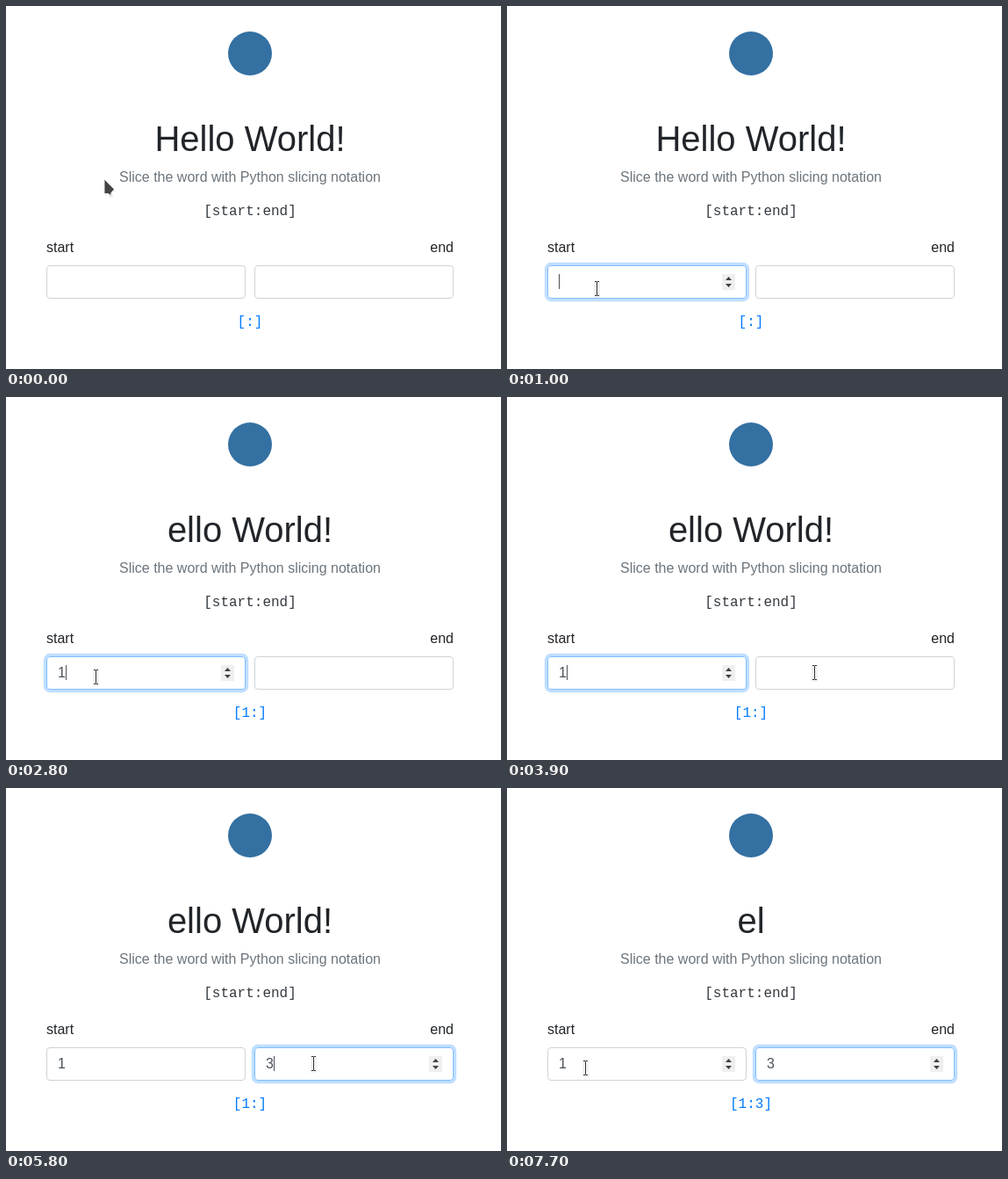
These frames come from a looping animation (564 px wide and 413 px high, 8 s). An HTML page:

```html
<!DOCTYPE html>
<html lang="en">
<head>
<meta charset="utf-8">
<title>Slicing demo</title>
<style>
  html, body { margin: 0; width: 564px; height: 413px; overflow: hidden; background: #fff; }
  body { position: relative; font: 16px/24px "Liberation Sans", sans-serif; color: #212529; }
  body > *, .field > * { position: absolute; }
  .row { left: 0; width: 556px; text-align: center; white-space: pre; }
  .mono { font-family: "Liberation Mono", monospace; }
  .logo { left: 253px; top: 29px; width: 50px; height: 50px; border-radius: 50%; background: #3470a2; }
  #title { top: 127px; font-size: 40px; line-height: 48px; }
  .field { top: 295px; width: 227px; height: 38px; box-sizing: border-box; border: 1px solid; border-radius: 4px; color: #495057; }
  .value { left: 12px; top: 6px; }
  .caret { top: 9px; width: 1px; height: 17px; background: #495057; }
  .spin { left: 198px; top: 9px; width: 15px; height: 18px; background: #efefef; }
  .pointer { left: 0; top: 0; overflow: visible; }
</style>
</head>
<body>
<div class="logo"></div>
<div class="row" id="title"></div>
<div class="row" style="top:183px;color:#6c757d">Slice the word with Python slicing notation</div>
<div class="row mono" style="top:222px;color:#343a40">[start:end]</div>
<div style="left:46px;top:263px">start</div>
<div style="right:54px;top:263px">end</div>
<div class="field" id="start" style="left:46px"></div>
<div class="field" id="end" style="left:283px"></div>
<div class="row mono" id="slice" style="top:348px;color:#007bff"></div>
<svg class="pointer" id="arrow" width="1" height="1">
  <path d="M1 2V19L4.5 16.5 7 21 10 19.5 8.5 15 13 14Z" fill="#000" opacity=".1"/>
  <path d="M0 0V16.5H4.5L7.5 18.8 8 15.5 11.3 11.5Z" fill="#444" stroke="#fff" stroke-width=".8"/>
</svg>
<svg class="pointer" id="beam" width="1" height="1">
  <path d="M-3.5 -8.5H3.5V10.5H-3.5Z" fill="#000" opacity=".05"/>
  <path d="M-2.5 -8H-.5L0 -7.5 .5 -8H2.5M0 -7.5V7.5M-2.5 8H-.5L0 7.5 .5 8H2.5" fill="none" stroke="#333"/>
</svg>
<script>
const LOOP = 8000, STEP = 100, WORD = 'Hello World!';
const $ = id => document.getElementById(id);

// Pointer positions: time, x, y; each holds until the next
const path = [
  [0, 112, 197], [100, 112, 201], [200, 110, 230], [300, 106, 272],
  [400, 103.5, 308], [500, 102.5, 322.5], [1000, 102.5, 321.5],
  [1100, 102.5, 323.5], [1300, 102.5, 319.5], [1500, 102.5, 318.5],
  [3600, 128.5, 317.5], [3700, 220.5, 311.5], [3800, 325.5, 306.5], [3900, 350.5, 313.5],
  [6700, 340.5, 314.5], [6800, 292.5, 316.5], [6900, 235.5, 319.5], [7000, 180.5, 320.5],
  [7100, 130.5, 321.5], [7200, 100.5, 320.5], [7300, 89.5, 318.5]
];

const during = (t, ...spans) => spans.some(([from, to]) => t >= from && t < to);
const ease = (t, from) => {
  const u = Math.min(1, Math.max(0, (t - from) / 150));
  return u * u * (3 - 2 * u);
};
const mix = (a, b, p) => a.map((v, i) => Math.round(v + (b[i] - v) * p));
const show = (el, on) => { el.style.visibility = on ? 'visible' : 'hidden'; };

function makeField(id) {
  const el = $(id);
  el.innerHTML = '<span class="value"></span><i class="caret"></i>' +
    '<svg class="spin"><path d="M4 7H11L7.5 3ZM4 11H11L7.5 15Z" fill="#404040"/></svg>';
  const [value, caret, spin] = el.children;
  return (text, focus, caretOn, spinOn) => {
    value.textContent = text;
    caret.style.left = (text ? 21 : 12) + 'px';
    show(caret, caretOn);
    show(spin, spinOn);
    el.style.borderColor = `rgb(${mix([206, 212, 218], [128, 189, 255], focus)})`;
    el.style.boxShadow = `0 0 0 ${3.2 * focus}px rgba(0,123,255,${0.25 * focus})`;
  };
}
const drawStart = makeField('start'), drawEnd = makeField('end');

function draw(now) {
  const t = Math.floor(now % LOOP / STEP) * STEP;
  const start = t >= 2800 ? '1' : '';
  const end = t >= 5900 ? '3' : '';
  const moved = ease(t, 4705);

  $('title').textContent = WORD.slice(+start, end ? +end : undefined);
  $('slice').textContent = `[${start}:${end}]`;
  drawStart(start, ease(t, 860) - moved,
    during(t, [900, 1800], [2300, 3300], [3800, 4700]),
    during(t, [500, 4700], [7100, LOOP]));
  drawEnd(t >= 5800 ? '3' : '', moved,
    during(t, [4700, 6500], [7100, 7700]), t >= 4300);

  const [, x, y] = path.findLast(p => p[0] <= t);
  for (const id of ['arrow', 'beam']) {
    $(id).style.transform = `translate(${x}px,${y}px)`;
    show($(id), (id === 'arrow') === (t < 400));
  }
}

const begin = performance.now();
function tick() {
  draw(performance.now() - begin);
  requestAnimationFrame(tick);
}
tick();
</script>
</body>
</html>
```
